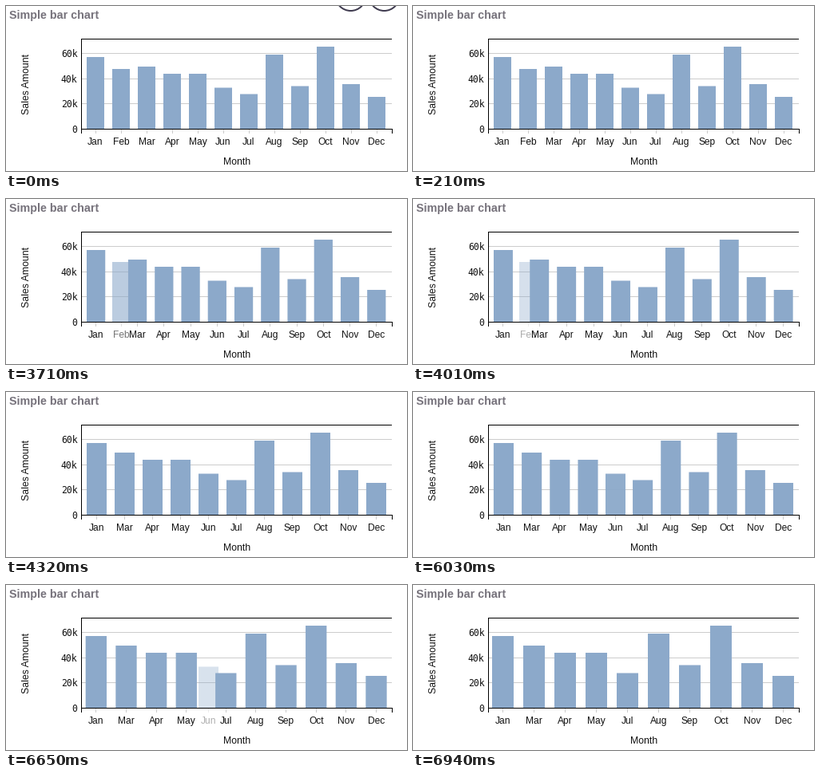
Recreate the animation shown at these times as a matplotlib script. Size 502x207 px, loop 8 s.

```python
import matplotlib.pyplot as plt
from matplotlib.animation import FuncAnimation
from matplotlib.patches import Circle, Rectangle

W, H, DPI = 502, 207, 64
LOOP, STEP = 8000, 20

MONTHS = "Jan Feb Mar Apr May Jun Jul Aug Sep Oct Nov Dec".split()
TOPS = dict(zip(MONTHS, [64, 79, 76, 85, 85, 102.5, 110.5, 61, 100.5, 51, 98, 114]))
BASE = 154
BAR, GRID, INK = "#8ca9ca", "#cccccc", "#111111"

fig = plt.figure(figsize=(W / DPI, H / DPI), dpi=DPI, facecolor="white")
ax = fig.add_axes([0, 0, 1, 1])
ax.set(xlim=(0, W), ylim=(H, 0))
ax.axis("off")


def rect(x, y, w, h, color, z):
    return ax.add_patch(Rectangle((x, y), w, h, fc=color, lw=0, zorder=z, snap=False))


def label(x, y, s, px=12, color=INK, font="Liberation Sans", ha="center", **kw):
    return ax.text(x, y, s, fontsize=px * 72 / DPI, color=color, family=font,
                   ha=ha, va=kw.pop("va", "baseline"), zorder=5, **kw)


def layout(months, first, step, width):
    return {m: (first + i * step, width) for i, m in enumerate(months)}


no_feb = [m for m in MONTHS if m != "Feb"]
no_jun = [m for m in no_feb if m != "Jun"]
LAYOUTS = [
    layout(MONTHS, 112, 32, 22),
    layout(no_feb, 113.5, 35, 25),
    layout(no_jun, 112.5, 39, 27),
]

# start of motion, first visible step, end
MOVES = [(3290, 3320, 4315), (5985, 6030, 6940)]
TICK = 77


def progress(t, move):
    start, first, end = move
    if t < first:
        return 0
    if t >= end:
        return 1
    held = first + (t - first) // TICK * TICK
    return min(1, (held - start) / 1000)


# static parts
label(4, 16, "Simple bar chart", 14.2, "#77737c", ha="left", weight="bold")
label(289, 199, "Month", 12.2)
label(32, 97.5, "Sales Amount", 12.3, rotation=90, ha="right", va="center")
for y, s in [(59, "60k"), (91, "40k"), (122, "20k"), (BASE, "0")]:
    rect(94, y, 389, 1, GRID, 1)
    label(89.5, y + 5, s, 11.5, font="DejaVu Sans Mono", ha="right")
for x, y, w, h in [(94, 41, 389, 1), (94, BASE, 390, 1), (94, 41, 1, 119), (483, BASE, 1, 6)]:
    rect(x, y, w, h, "black", 4)

rings = [ax.add_patch(Circle((x, -13), 19, fill=False, ec="#3f3b4f", lw=2 * 72 / DPI))
         for x in (431.5, 473.5)]

bars = {m: (rect(0, TOPS[m], 22, BASE - TOPS[m], BAR, 2),
            rect(0, BASE + 1, 1, 5, GRID, 3),
            label(0, 174, m)) for m in MONTHS}


def place(m, x, width, alpha):
    bar, tick, text = bars[m]
    bar.set_x(x - width / 2)
    bar.set_width(width)
    tick.set_x(round(x - 0.5))
    text.set_x(x)
    for part in bars[m]:
        part.set_alpha(alpha)
        part.set_visible(alpha > 0)


def draw(i):
    t = i * STEP + STEP / 2
    for ring in rings:
        ring.set_visible(t < 210)
    stage = int(t >= MOVES[0][2])
    old, new = LAYOUTS[stage], LAYOUTS[stage + 1]
    p = progress(t, MOVES[stage])
    for m in MONTHS:
        if m not in old:
            place(m, 0, 0, 0)
        elif m not in new:
            place(m, *old[m], 1 - p)
        else:
            x, w = (a + (b - a) * p for a, b in zip(old[m], new[m]))
            place(m, x, w, 1)
    return []


anim = FuncAnimation(fig, draw, frames=LOOP // STEP, interval=STEP,
                     repeat=True, repeat_delay=0, init_func=lambda: draw(0))
plt.show()
```
